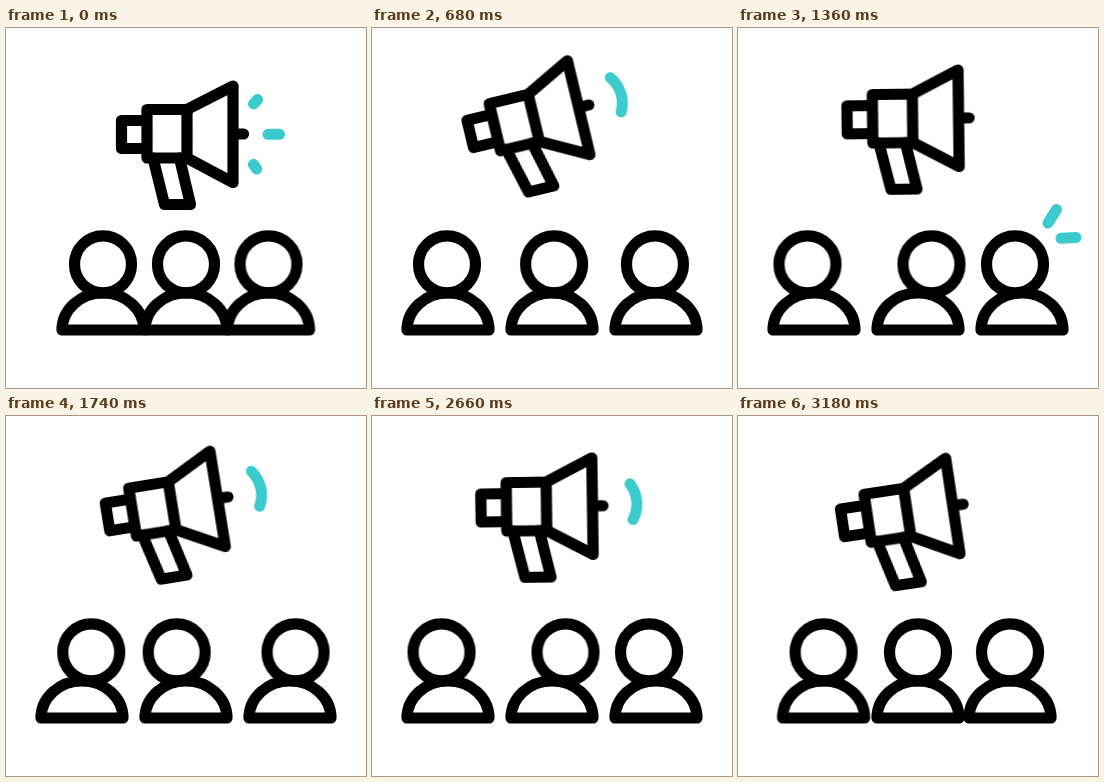
These frames come from a looping animation (360 px wide and 360 px high, 3200 ms). An HTML page:

```html
<!DOCTYPE html>
<html lang="en">
<head>
<meta charset="utf-8">
<title>Megaphone and audience</title>
<style>
html, body { margin: 0; width: 100%; height: 100%; overflow: hidden; background: #fff; }
svg { display: block; width: 100vw; height: 100vh; }
svg * { fill: none; stroke-linecap: round; stroke-linejoin: round; }

.ink { stroke: #000; stroke-width: 11.2; }
.accent { stroke: #3bcbcd; stroke-width: 11; }

.left, .right, .lift, .head, .tilt, .burst, .ray, .near, .far {
  animation: 3.2s cubic-bezier(.3333, 0, .6667, 1) infinite;
}
.left { animation-name: left; }
.right { animation-name: right; }
.lift { animation-name: lift; }
.head { animation-name: sway; }
.tilt { animation-name: tilt; transform-origin: 172px 162.5px; }
.burst, .ray { stroke-dasharray: 1 2; }
.burst { animation-name: burst; }
.ray { animation-name: ray; animation-delay: var(--d); }
.near { animation-name: near; animation-delay: var(--d); }
.far { animation-name: far; animation-delay: var(--d); }

/* The way back is cut off by the loop, so its last easing ends in mid-move. */
@keyframes left {
  0%, 6.875% { transform: translateX(0); }
  18.1% { transform: translateX(-21px); }
  93.4% {
    transform: translateX(-21px);
    animation-timing-function: cubic-bezier(.3333, 0, .6667, .5);
  }
  100% { transform: translateX(-9.9px); }
}
@keyframes right {
  0%, 6.875% { transform: translateX(0); }
  19.4% { transform: translateX(21.5px); }
  92.7% {
    transform: translateX(21.5px);
    animation-timing-function: cubic-bezier(.3333, 0, .6667, .55);
  }
  100% { transform: translateX(8px); }
}
@keyframes lift {
  0%, 8.1% { transform: translate(0, 0); }
  21.25% { transform: translate(-5.7px, -15.3px); }
  93.75% {
    transform: translate(-5.7px, -15.3px);
    animation-timing-function: cubic-bezier(.3333, 0, .6667, .5);
  }
  100% { transform: translate(-2.8px, -7.6px); }
}
@keyframes sway {
  0%, 19.4% { transform: translateX(0); }
  26.9%, 44.4% { transform: translateX(var(--a)); }
  56.9%, 73.1% { transform: translateX(var(--b)); }
  83.4%, 87.5% { transform: translateX(var(--a)); }
  96.9%, 100% { transform: translateX(0); }
}
@keyframes tilt {
  0%, 8.1% { transform: rotate(0deg); }
  21.25%, 27.2% { transform: rotate(-13.5deg); }
  45%, 47.2% { transform: rotate(0deg); }
  59.7%, 63.4% { transform: rotate(-15deg); }
  80.3%, 81.6% { transform: rotate(0deg); }
  92.5% { transform: rotate(-15deg); }
  93.75% {
    transform: rotate(-15deg);
    animation-timing-function: cubic-bezier(.3333, 0, .6667, .5);
  }
  100% { transform: rotate(-7.5deg); }
}
@keyframes burst {
  0%, 6.875% { stroke-dashoffset: 0; opacity: 1; }
  10% { stroke-dashoffset: -.98; opacity: 1; }
  10.01%, 100% { stroke-dashoffset: -.98; opacity: 0; }
}
@keyframes ray {
  0% { stroke-dashoffset: .98; opacity: 1; }
  3.1%, 6.25% { stroke-dashoffset: 0; opacity: 1; }
  10% { stroke-dashoffset: -.98; opacity: 1; }
  10.01%, 100% { stroke-dashoffset: -.98; opacity: 0; }
}
@keyframes near {
  0% { opacity: 0; }
  2.5%, 10% { opacity: 1; }
  14.4%, 100% { opacity: 0; }
}
@keyframes far {
  0%, 4.4% { opacity: 0; }
  7.5%, 10% { opacity: 1; }
  14.4%, 100% { opacity: 0; }
}
</style>
</head>
<body>
<svg viewBox="0 0 360 360">
  <defs>
    <path id="body" d="M-41 302A41 37 0 0 1 41 302Z"/>
    <circle id="skull" cy="236.3" r="28.5"/>
    <path id="inner" d="M264.8 84.5A33 33 0 0 1 267.3 120.3"/>
    <path id="outer" d="M282 69A62 62 0 0 1 285 138.6"/>
  </defs>

  <!-- audience -->
  <g class="ink">
    <g transform="translate(97)">
      <g class="left">
        <use href="#body"/>
        <use href="#skull" class="head" style="--a:-6.5px;--b:11px"/>
      </g>
    </g>
    <g transform="translate(180)">
      <use href="#body"/>
      <use href="#skull" class="head" style="--a:13.5px;--b:-12px"/>
    </g>
    <g transform="translate(262.5)">
      <g class="right">
        <use href="#body"/>
        <use href="#skull" class="head" style="--a:-7px;--b:7px"/>
      </g>
    </g>
  </g>

  <!-- reaction rays -->
  <g class="accent">
    <path class="ray" style="--d:-1.1s" pathLength="1" d="M58 195L49.5 181.5"/>
    <path class="ray" style="--d:-1.1s" pathLength="1" d="M46 210.3L31 209.5"/>
    <path class="ray" style="--d:-2.02s" pathLength="1" d="M310 195L318.5 181.5"/>
    <path class="ray" style="--d:-2.02s" pathLength="1" d="M323 210.3L338 209.5"/>
  </g>

  <!-- megaphone -->
  <g class="lift">
    <g class="tilt">
      <g class="ink">
        <path d="M141 81.5H181V130H141ZM141 92.5H115.5V120.5H141"/>
        <path d="M181 81.5L227 58V154.5L181 130M227 106H237.5"/>
        <path d="M147 130L158.5 176.5H184.5L173.5 130"/>
      </g>
      <g class="accent">
        <path class="burst" pathLength="1" d="M247.5 76L251.5 71.5"/>
        <path class="burst" pathLength="1" d="M262 106.3H273.5"/>
        <path class="burst" pathLength="1" d="M247.5 136.5L250.7 141"/>
        <g style="--d:-2.62s"><use href="#inner" class="near"/><use href="#outer" class="far"/></g>
        <g style="--d:-1.56s"><use href="#inner" class="near"/><use href="#outer" class="far"/></g>
        <g style="--d:-.62s"><use href="#inner" class="near"/><use href="#outer" class="far"/></g>
      </g>
    </g>
  </g>
</svg>
</body>
</html>
```
